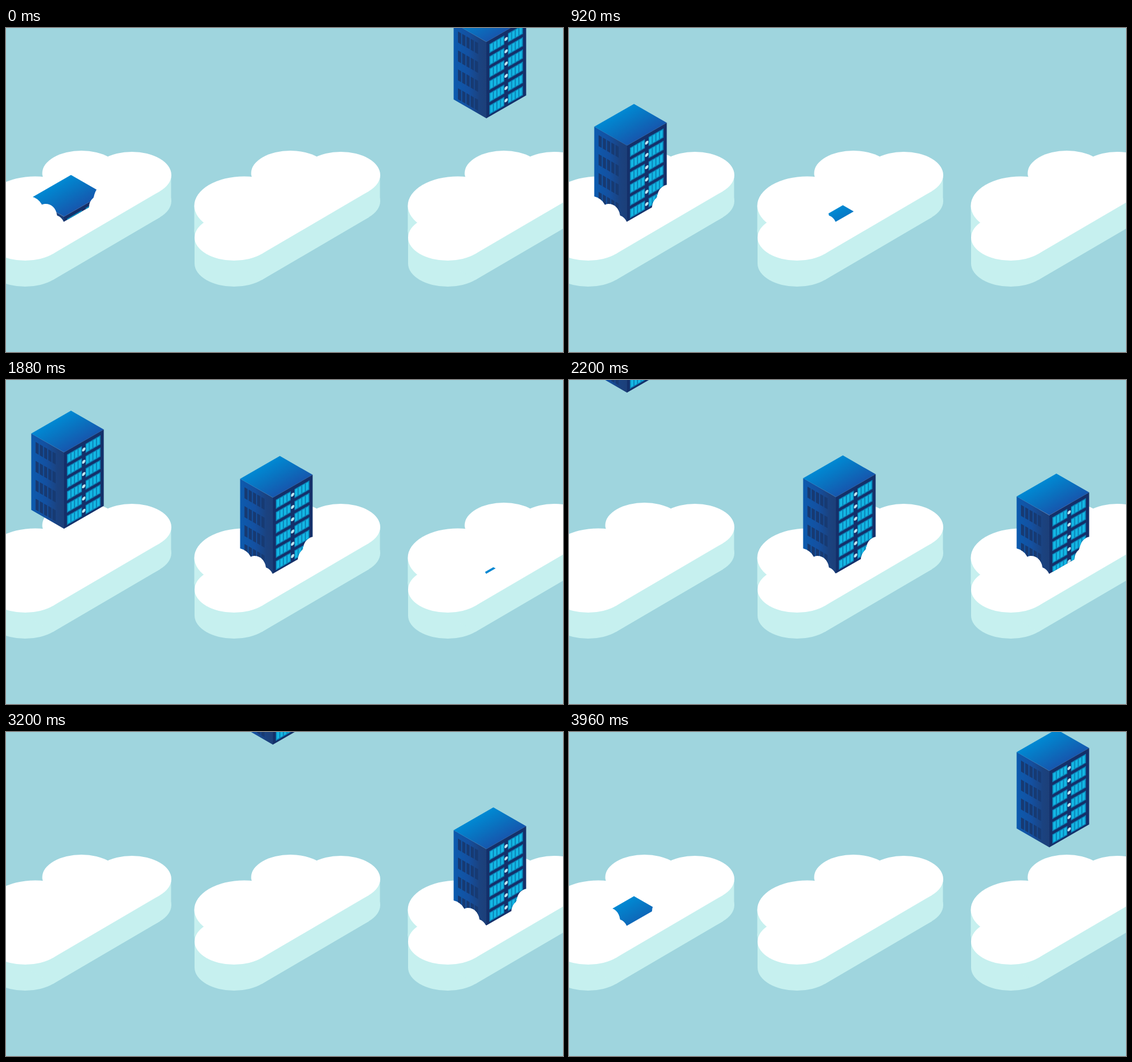
An HTML page for the animation above (4000 ms loop, 960 px wide and 560 px high).

```html
<!DOCTYPE html>
<html lang="en">
<head>
<meta charset="utf-8">
<title>Servers passing through clouds</title>
<style>
  html, body { margin: 0; width: 100%; height: 100%; overflow: hidden; background: #9fd5de; }
  svg { display: block; width: 960px; height: 560px; }
</style>
</head>
<body>
<svg viewBox="0 0 960 560">
  <defs>
    <linearGradient id="roof" gradientUnits="userSpaceOnUse" x1="438" y1="150" x2="465.6" y2="199">
      <stop offset="0" stop-color="#0089d3"/>
      <stop offset=".5" stop-color="#0a71bf"/>
      <stop offset="1" stop-color="#1657ae"/>
    </linearGradient>
    <linearGradient id="flank">
      <stop offset="0" stop-color="#0c5baf"/>
      <stop offset=".45" stop-color="#1450a0"/>
      <stop offset=".8" stop-color="#1b427f"/>
      <stop offset="1" stop-color="#1c3f79"/>
    </linearGradient>
    <clipPath id="opening">
      <path d="M395 291H403Q416 294 422 305.5C432 301 446 307 448 324Q456 327 459.5 335L503 310Q503 300 511 293Q515 273 529 271H540V-400H395Z"/>
    </clipPath>
    <g id="puffs">
      <ellipse cx="490" cy="251" rx="67.5" ry="39"/>
      <ellipse cx="577" cy="254" rx="68" ry="40"/>
      <ellipse cx="410.5" cy="307" rx="86" ry="50.5"/>
      <ellipse cx="393" cy="362" rx="68" ry="40"/>
      <path d="M393 362L441 390.3L625 282.3L577 254L490 251L410 307Z"/>
    </g>
    <g id="cloud">
      <g fill="#c6f0ef">
        <use href="#puffs" y="45"/>
        <path d="M324.5 307H400V352H324.5ZM325 362H441V407H325ZM577 254H644.5V299H577ZM441 390.3L625 282.3V327.3L441 435.3Z"/>
      </g>
      <use href="#puffs" fill="#fff"/>
    </g>
    <g id="server">
      <path d="M472 131L528.5 163.5L460 203L403.5 170.4Z" fill="url(#roof)"/>
      <g transform="translate(403.5 170.4) skewY(30)">
        <rect width="56.7" height="132" fill="url(#flank)"/>
        <g id="vents" fill="#173a72"></g>
      </g>
      <g transform="translate(460 203) skewY(-30)">
        <rect width="68.5" height="132" fill="#14306a"/>
        <g id="racks"></g>
      </g>
    </g>
  </defs>
  <g id="scene"></g>
</svg>
<script>
  const LOOP = 4000, STEP = 40, HALF = 1000;
  const BELOW = 246, ABOVE = -358;
  const columns = [{ x: -360, delay: 0 }, { x: 0, delay: 1000 }, { x: 368, delay: 2000 }];
  const byId = id => document.getElementById(id);
  const repeat = (count, draw) => Array.from({ length: count }, (_, i) => draw(i)).join('');
  const rect = (x, y, w, h, fill) =>
    `<rect x="${x}" y="${y}" width="${w}" height="${h}"${fill ? ` fill="${fill}"` : ''}/>`;

  byId('vents').innerHTML = repeat(4, row => repeat(5, col =>
    rect(7.5 + col * 7.3, 10.3 + row * 32.7, 5.4, 19)));

  byId('racks').innerHTML = repeat(6, row => {
    const mid = 14.6 + row * 21.2;
    const bars = start => repeat(4, i => rect(start + i * 6.2, mid - 6.3, 4.4, 12.6, '#13b7e4'));
    return rect(5, mid - 8, 25.8, 16, '#0b7fb4') + rect(37.2, mid - 8, 25.8, 16, '#0b7fb4') +
      bars(6.6) + bars(38.2) + `<circle cx="34" cy="${mid}" r="2.9" fill="#bfe6f1"/>`;
  });

  byId('scene').innerHTML = columns.map(({ x }) => `
    <g transform="translate(${x})">
      <use href="#cloud"/>
      <g clip-path="url(#opening)"><use class="mover" href="#server"/></g>
    </g>`).join('');
  const movers = [...document.querySelectorAll('.mover')];

  function easeInOutExpo(p) {
    if (p <= 0 || p >= 1) return p <= 0 ? 0 : 1;
    return p < .5 ? 2 ** (20 * p - 11) : 1 - 2 ** (9 - 20 * p);
  }

  // Each server rises into place for half the loop, then leaves upwards.
  function offset(time, delay) {
    const local = (time - delay + LOOP + HALF) % LOOP;
    return local < LOOP / 2
      ? BELOW * (1 - easeInOutExpo(local / (LOOP / 2)))
      : ABOVE * easeInOutExpo(local / (LOOP / 2) - 1);
  }

  function draw(now) {
    const time = Math.floor(now / STEP + .05) * STEP % LOOP;
    movers.forEach((mover, i) =>
      mover.setAttribute('transform', `translate(0 ${offset(time, columns[i].delay).toFixed(2)})`));
  }

  function tick(now) {
    draw(now);
    requestAnimationFrame(tick);
  }
  draw(0);
  requestAnimationFrame(tick);
</script>
</body>
</html>
```
